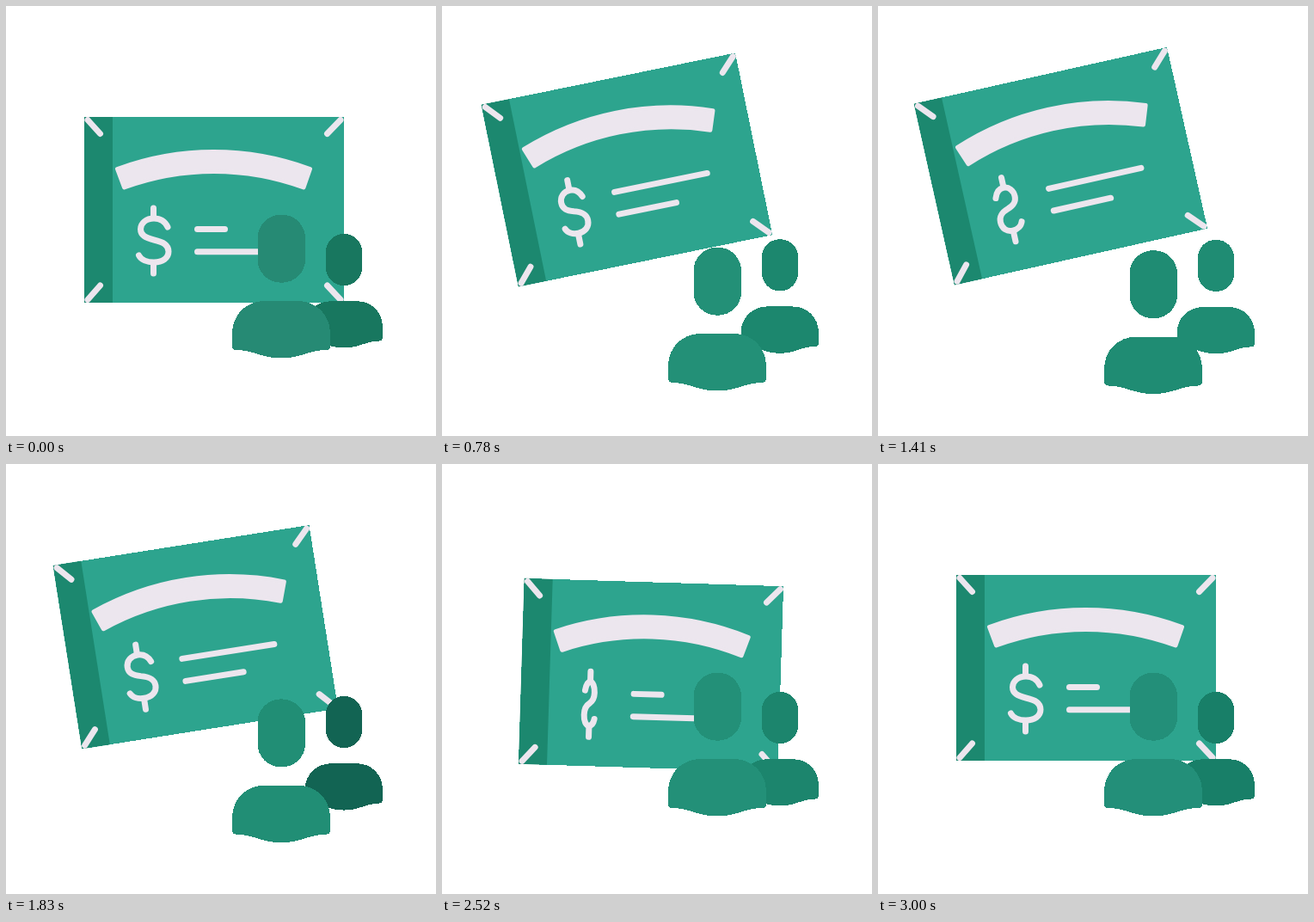
Recreate the animation shown at these times as an HTML page. Size 500 px wide and 500 px high, loop 5030 ms.

```html
<!DOCTYPE html>
<html lang="en">
<head>
<meta charset="utf-8">
<title>Cheque and people</title>
<style>
  html, body { margin: 0; width: 100%; height: 100%; overflow: hidden; background: #fff; }
  svg { display: block; width: 500px; height: 500px; }
  .crisp { shape-rendering: crispEdges; }
  .light { fill: #ece6ee; stroke: #ece6ee; stroke-width: 5; stroke-linejoin: round; }
  .line { fill: none; stroke: #ece6ee; stroke-width: 7; stroke-linecap: round; }
  #dollar path { vector-effect: non-scaling-stroke; }
</style>
</head>
<body>
<svg viewBox="0 0 500 500">
  <g id="card">
    <path class="crisp" fill="#2da48e" d="M91 129H392.5V345H91z"/>
    <path fill="#1c886f" d="M91 129h33v216h-33z"/>
    <path class="line" d="M95 132.5L109.5 148.5M389 132.5L373.5 148.5M95 341.5L109.5 325M389 341.5L373.5 325"/>
    <path class="light" d="M129.5 189.5A323 323 0 0 1 353.5 189.5L346 211A303 303 0 0 0 137.5 211Z"/>
    <g id="dollar">
      <path class="line" d="M0-38V-27M0 27V38"/>
      <path class="line" d="M16.5-16C13.5-22.5 7.5-26 .5-26C-8.5-26-15-20.5-15-13.5C-15-6.5-9.5-3.5 .5-1C11.5 1.5 17.5 5 17.5 12.5C17.5 20 10.5 25 .5 25C-7.5 25-14.5 22-17 17"/>
    </g>
    <path class="line" id="upper"/>
    <path class="line" id="lower"/>
  </g>
  <g id="back" class="crisp">
    <rect x="372" y="265" width="42" height="60" rx="20.5"/>
    <path d="M347.5 374C347.5 356 361 343.2 378 343.2H408C425 343.2 438 356 438 374V385Q438 389.5 434 389.5C417 390 411 397.5 393 397.5C375 397.5 369 390 352 389.5Q347.5 389.5 347.5 385Z"/>
  </g>
  <g id="front" class="crisp">
    <rect x="292.5" y="242.7" width="55.5" height="79" rx="27"/>
    <path d="M263 381C263 359 279 343 301 343H339C361 343 377 359 377 381V395Q377 400 372 400C351 400.5 343 409.5 320 409.5C297 409.5 289 400.5 268 400Q263 400 263 395Z"/>
  </g>
</svg>
<script>
const LOOP = 5030, MOVE = 3000, RISE = 1200, STEP = 30;
const $ = id => document.getElementById(id);

const cubic = (a, b, s) => 3 * s * (1 - s) ** 2 * a + 3 * s * s * (1 - s) * b + s ** 3;

// CSS-style cubic-bezier easing, solved by bisection.
function bezier(x1, y1, x2, y2) {
  return x => {
    let low = 0, high = 1;
    for (let i = 0; i < 24; i++) {
      const mid = (low + high) / 2;
      if (cubic(x1, x2, mid) < x) low = mid; else high = mid;
    }
    return cubic(y1, y2, low);
  };
}
const riseEase = bezier(0.27, 0, 0.3, 1);
const spinEase = bezier(1 / 3, 0.37, 2 / 3, 0.83);

const clamp = x => Math.min(1, Math.max(0, x));

// Rises and returns along the same curve.
const lift = t => riseEase(clamp(1 - Math.abs(t / RISE - 1)));

// A gentle swing past the resting pose while the card settles.
const settle = t => Math.sin(Math.PI * clamp((t - 1650) / 1350)) ** 2;

const tints = [
  $('front').animate({ fill: ['#268a74', '#239077', '#1f8c73', '#239077', '#238f79'] },
    { duration: MOVE, fill: 'both' }),
  $('back').animate({
    fill: ['#18775f', '#1a846b', '#1f8c73', '#126453', '#1c856d', '#187f68'],
    offset: [0, 0.15, 0.47, 0.61, 0.84, 1]
  }, { duration: MOVE, fill: 'both' })
];
tints.forEach(tint => tint.pause());

function draw(t) {
  const set = (id, name, value) => $(id).setAttribute(name, value);
  const up = lift(t), swing = settle(t);
  const grow = 1 - (1 - up) ** 3;
  const flip = Math.cos(6 * Math.PI * spinEase(t / MOVE));
  const x = 1.6 * swing - 30 * up;
  const y = 10.5 * swing - 52 * up;
  const tilt = 2.2 * swing - 12.9 * up;

  set('card', 'transform', `translate(${x} ${y}) rotate(${tilt} 241.7 237)`);
  set('dollar', 'transform', `translate(171.5 273) scale(${flip} 1)`);
  set('upper', 'd', `M222.5 259.5h${32 + 78 * grow}`);
  set('lower', 'd', `M222.5 285.8h${71 - 3 * grow}`);
  set('front', 'transform', `translate(0 ${42.5 * up})`);
  set('back', 'transform', `translate(0 ${7 * up})`);
  tints.forEach(tint => { tint.currentTime = t; });
}

const start = performance.now();
function tick() {
  const t = (performance.now() - start) % LOOP;
  draw(Math.min(MOVE, Math.floor(t / STEP) * STEP));
  requestAnimationFrame(tick);
}
tick();
</script>
</body>
</html>
```
